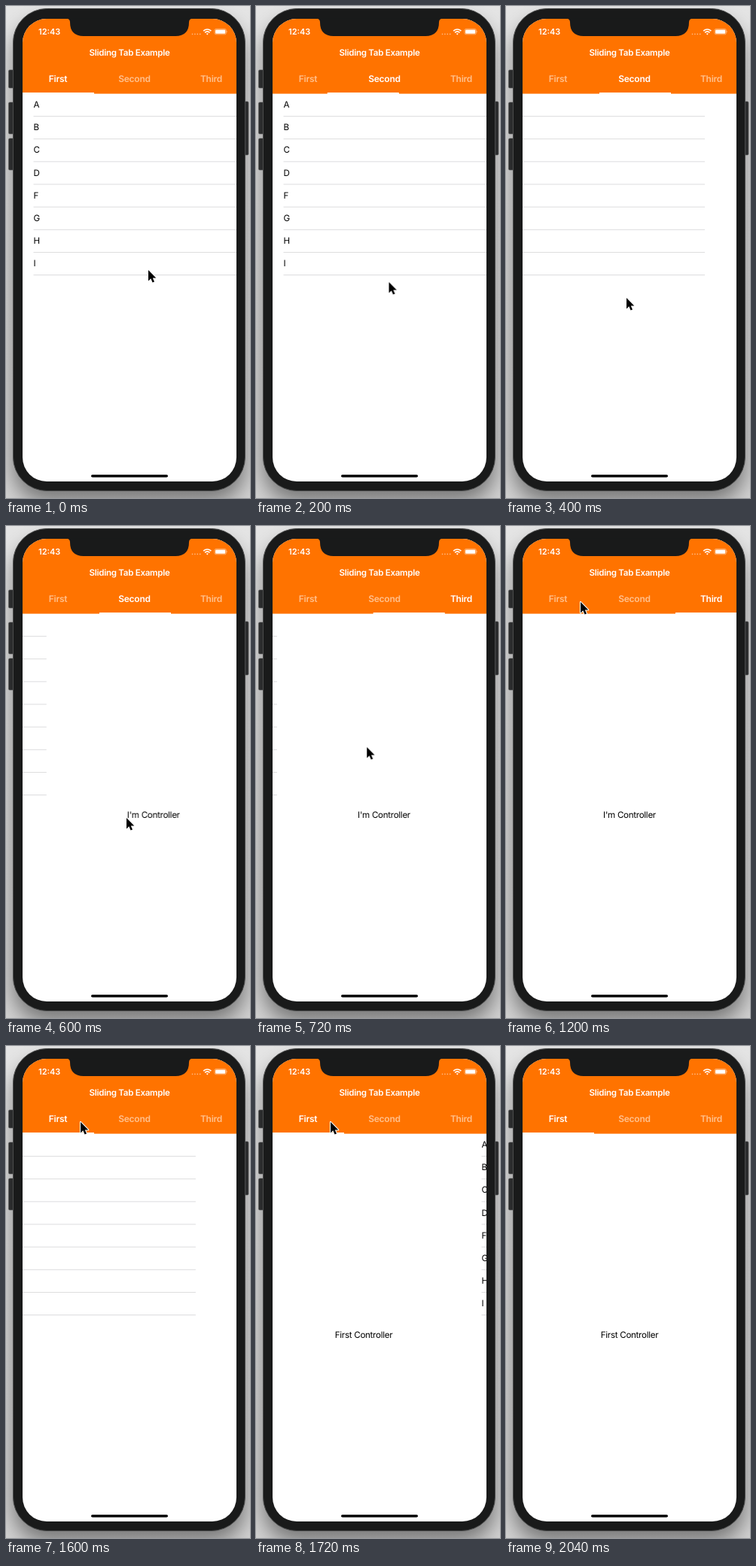
Recreate the animation shown at these times as an HTML page. Size 324 by 654 pixels, loop 2600 ms.

```html
<!DOCTYPE html>
<html lang="en">
<head>
<meta charset="utf-8">
<title>Sliding Tab Example</title>
<style>
html, body { margin: 0; width: 100%; height: 100%; overflow: hidden; background: #dedede; }
svg { display: block; width: 324px; height: 654px; }
text { font: 400 11.6px Inter, Roboto, sans-serif; letter-spacing: -.025em; text-rendering: geometricPrecision; }
.bar text { fill: #fff; text-anchor: middle; font-weight: 600; }
.bar .tab { font-size: 12px; letter-spacing: -.02em; }
.bar .clock { font-size: 11px; letter-spacing: 0; text-anchor: start; }
.page { text-anchor: middle; }
.rows line { stroke: #dcdcde; stroke-width: 1; }

#pages, #mark, #cursor, .tab { animation: 2600ms linear infinite; }
#pages { animation-name: pages; }
#mark { animation-name: mark; }
#cursor { animation-name: cursor; }
.tab { animation-timing-function: step-end; }
#tab1 { animation-name: tab1; }
#tab2 { animation-name: tab2; }
#tab3 { animation-name: tab3; }

/* drag, release with decay, then a two-page jump back */
@keyframes pages {
  0%, 10.77% { transform: translateX(0); animation-timing-function: ease-in; }
  15.38%, 18.08% { transform: translateX(-42px); }
  18.46% { transform: translateX(-110px); }
  20% { transform: translateX(-187px); }
  21.54% { transform: translateX(-229px); }
  23.08% { transform: translateX(-252px); }
  24.62% { transform: translateX(-265px); }
  26.15% { transform: translateX(-273px); }
  27.69% { transform: translateX(-278px); }
  30.77% { transform: translateX(-283px); }
  33.08% { transform: translateX(-284px); }
  56.69% { transform: translateX(-284px); animation-timing-function: ease-in-out; }
  67.69%, 100% { transform: translateX(284px); }
}
@keyframes mark {
  0%, 1.2% { transform: translateX(0); animation-timing-function: ease-in-out; }
  11.54% { transform: translateX(101.5px); }
  24.3% { transform: translateX(101.5px); animation-timing-function: ease-in-out; }
  33.08% { transform: translateX(203px); }
  55% { transform: translateX(203px); animation-timing-function: ease-in-out; }
  61.15%, 100% { transform: translateX(0); }
}
@keyframes tab1 { 0%, 55.38%, 100% { opacity: 1; } 1.54% { opacity: .55; } }
@keyframes tab2 { 0%, 24.62%, 100% { opacity: .55; } 1.54% { opacity: 1; } }
@keyframes tab3 { 0%, 55.38%, 100% { opacity: .55; } 24.62% { opacity: 1; } }
@keyframes cursor {
  0%, 1.2% { transform: translate(189px, 351px); animation-timing-function: ease-in-out; }
  15.38% { transform: translate(160px, 388px); }
  23.4% { transform: translate(160px, 388px); animation-timing-function: ease-in-out; }
  33.85% { transform: translate(124px, 123px); animation-timing-function: ease-out; }
  43.08% { transform: translate(99.5px, 103px); }
  46.15%, 73.08% { transform: translate(99px, 101px); opacity: 1; }
  77.69% { transform: translate(60px, 36px); opacity: 1; }
  77.7%, 100% { transform: translate(60px, 36px); opacity: 0; }
}
</style>
</head>
<body>
<svg viewBox="0 0 324 654">
  <defs>
    <linearGradient id="wall" x2="0" y2="1">
      <stop offset="0" stop-color="#e4e4e4"/>
      <stop offset="1" stop-color="#d2d2d2"/>
    </linearGradient>
    <filter id="soft" x="-20%" y="-20%" width="140%" height="140%"><feGaussianBlur stdDeviation="13"/></filter>
    <clipPath id="screen"><rect x="22" y="17" width="284" height="615" rx="32"/></clipPath>
  </defs>

  <rect width="324" height="654" fill="url(#wall)"/>
  <rect x="9" y="20" width="309" height="640" rx="46" opacity=".42" filter="url(#soft)"/>

  <g fill="#2b2c2d" stroke="#555" stroke-width=".6">
    <rect x="3.5" y="85" width="8" height="24" rx="1.5"/>
    <rect x="3.5" y="128" width="8" height="42" rx="1.5"/>
    <rect x="3.5" y="176" width="8" height="42" rx="1.5"/>
    <rect x="314" y="127" width="8" height="71" rx="1.5"/>
  </g>
  <rect x="9.5" y="3.5" width="308" height="641" rx="45" fill="#191a1a" stroke="#4c4d4d"/>

  <g clip-path="url(#screen)">
    <rect x="22" y="17" width="284" height="615" fill="#fff"/>
    <g id="pages">
      <text class="page" x="-120" y="388">First Controller</text>
      <g class="rows" id="rows"></g>
      <text class="page" x="448" y="388">I'm Controller</text>
    </g>

    <g class="bar">
      <rect x="22" y="17" width="284" height="99.6" fill="#ff7300"/>
      <rect id="mark" x="22" y="115" width="95" height="2" fill="#fff"/>
      <text class="clock" x="43" y="38">12:43</text>
      <text x="164" y="66.2">Sliding Tab Example</text>
      <text class="tab" id="tab1" x="69" y="101.4">First</text>
      <text class="tab" id="tab2" x="170.5" y="101.4">Second</text>
      <text class="tab" id="tab3" x="272.5" y="101.4">Third</text>
    </g>

    <path d="M247.5 37.3h11" stroke="#fff" stroke-opacity=".5" stroke-width="1.7" stroke-linecap="round" stroke-dasharray="0 3.4"/>
    <g fill="none" stroke="#fff" stroke-width="1.6">
      <path d="M262.2 33.2q5.1-4.4 10.2 0M264.1 35.3q3.2-2.7 6.4 0"/>
      <path d="M265.8 36.8q1.5-1.2 3 0l-1.5 1.6z" fill="#fff" stroke="none"/>
    </g>
    <rect x="276.9" y="30.4" width="15.6" height="7.4" rx="2.2" fill="none" stroke="#fff" stroke-opacity=".5" stroke-width=".8"/>
    <rect x="278" y="31.5" width="13.4" height="5.2" rx="1.2" fill="#fff"/>
    <path d="M293.4 32.8q1.4 1.3 0 2.6z" fill="#fff" opacity=".6"/>
    <rect x="113" y="623" width="102" height="3.6" rx="1.8"/>
  </g>

  <path d="M80 16.5q5 .5 5 5q0 18.5 18 18.5h122q18 0 18-18.5q0-4.5 5-5z" fill="#191a1a"/>

  <g id="cursor">
    <path d="M0 0V14.4L3.3 11.3 5.6 16.5 8 15.5 5.8 10.4H10.3Z" stroke="#fff" stroke-width="2" stroke-linejoin="round" paint-order="stroke"/>
  </g>
</svg>
<script>
const pitch = 30.14;
document.getElementById('rows').innerHTML = [...'ABCDFGHI'].map((letter, i) => {
  const y = i * pitch;
  return `<text x="36.5" y="${135.2 + y}">${letter}</text>
    <line x1="36.5" x2="306" y1="${146.6 + y}" y2="${146.6 + y}"/>`;
}).join('');
</script>
</body>
</html>
```
